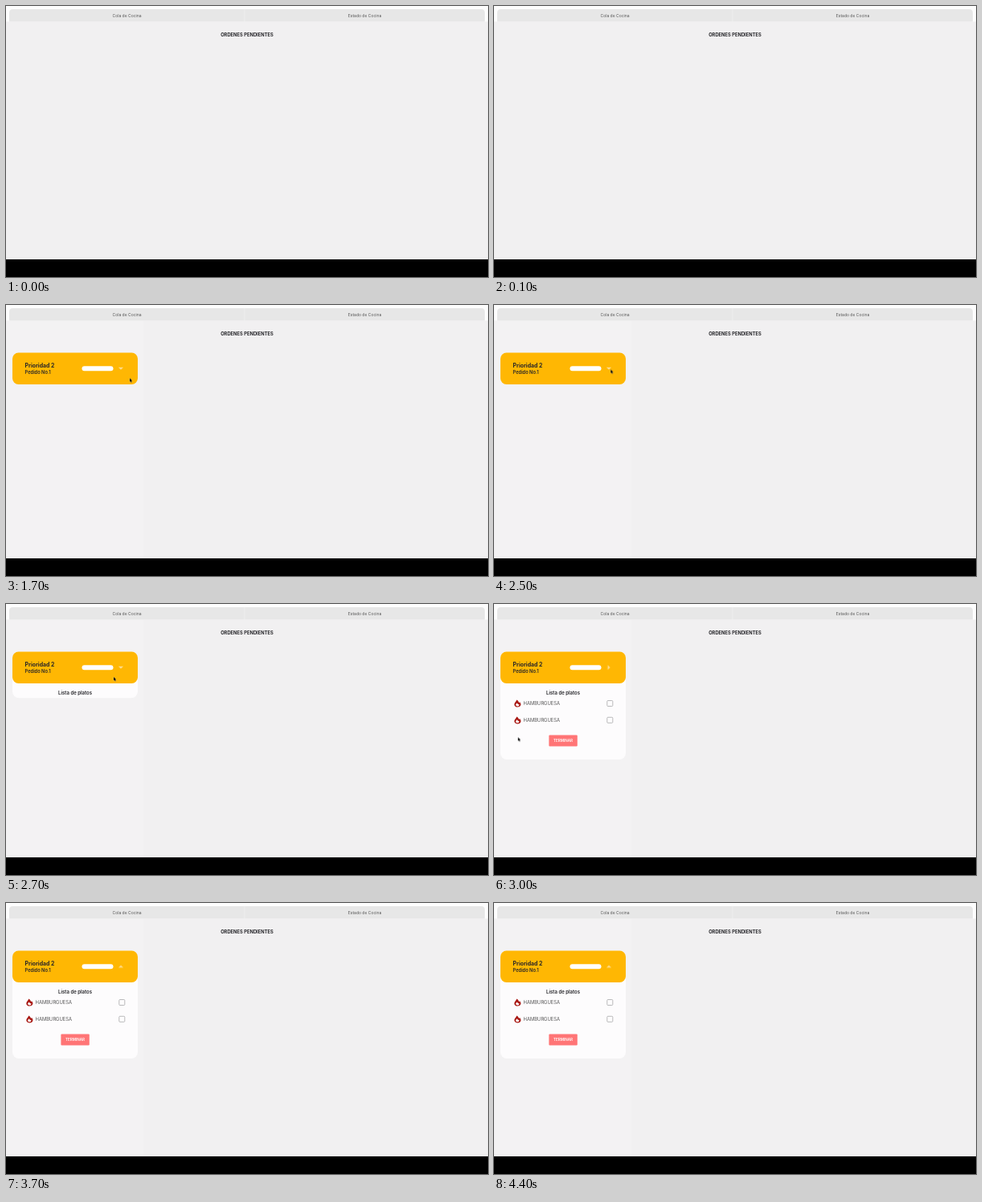
Write an HTML page that moves like this. It is 600 by 338 pixels and loops after 5 s.

```html
<!DOCTYPE html>
<html lang="es">
<head>
<meta charset="utf-8">
<title>Cola de Cocina</title>
<style>
  html, body { margin: 0; width: 100%; height: 100%; overflow: hidden; background: #000; }
  svg { display: block; width: 600px; height: 338px; }
  text { font-family: Inter, Roboto, sans-serif; fill: #242428; }
  .mid { text-anchor: middle; }
  .tab { font-size: 5px; fill: #555; }
  .bold { font-weight: 700; }
  .semi { font-weight: 600; }
  .dish { font-size: 5.9px; font-weight: 300; fill: #222; }

  .order, .panel, .body, .arrow, .cursor {
    animation: 5s -20ms infinite;
  }
  .order { animation-name: order; animation-timing-function: step-end; }
  .body { animation-name: body; animation-timing-function: step-end; }
  .panel { animation-name: expand; }
  .arrow { animation-name: flip; transform-origin: 143px 79.2px; animation-timing-function: linear; }
  .cursor { animation-name: point; animation-timing-function: step-end; }

  @keyframes order { 0% { opacity: 0 } 20%, 100% { opacity: 1 } }
  @keyframes body { 0% { opacity: 0 } 54%, 100% { opacity: 1 } }
  @keyframes expand {
    0%, 53% { height: 38px; animation-timing-function: cubic-bezier(.4, 0, .2, 1) }
    59%, 100% { height: 134.5px }
  }
  @keyframes flip {
    0%, 57% { transform: rotate(0deg) }
    64%, 100% { transform: rotate(-180deg) }
  }
  @keyframes point {
    0% { opacity: 0; transform: translate(167px, 105px) }
    32% { opacity: 1; transform: translate(167px, 105px) }
    34% { opacity: 1; transform: translate(154px, 91.3px) }
    36% { opacity: 1; transform: translate(149px, 88px) }
    38% { opacity: 1; transform: translate(146px, 86.5px) }
    40% { opacity: 1; transform: translate(145px, 86px) }
    48% { opacity: 1; transform: translate(145px, 83px) }
    50% { opacity: 1; transform: translate(145.2px, 80.5px) }
    54% { opacity: 1; transform: translate(134px, 91px) }
    56% { opacity: 1; transform: translate(94px, 128px) }
    58% { opacity: 1; transform: translate(48px, 158px) }
    60% { opacity: 1; transform: translate(29.8px, 166.2px) }
    66% { opacity: 1; transform: translate(62px, 181px) }
    68% { opacity: 1; transform: translate(142px, 220px) }
    70% { opacity: 1; transform: translate(246px, 268px) }
    72% { opacity: 1; transform: translate(336px, 305px) }
    74%, 100% { opacity: 0; transform: translate(336px, 305px) }
  }
</style>
</head>
<body>
<svg viewBox="0 0 600 338">
  <defs>
    <clipPath id="reveal"><rect class="panel" x="8" y="59.5" width="156" height="38" rx="8"/></clipPath>
    <g id="dish">
      <path fill="#a81712" d="M28.4 119.6C29.9 120.7 30.8 122 31.2 123.2L32.1 122.2C33 123.4 33.5 124.6 33.4 125.6C33.2 127.5 31.5 128.6 29.4 128.6C27.1 128.6 25.3 127.3 25.3 125.2C25.3 123.4 27.5 121.8 28.4 119.6Z"/>
      <path fill="#fdfcfd" d="M28.7 123.4L30.3 125.5L31.1 124.7C31.7 126.2 31.1 127.5 29.4 127.5C27.9 127.5 27 126.7 27.1 125.6C27.2 124.8 28.1 124.2 28.7 123.4Z"/>
      <text class="dish" x="36.6" y="126.1">HAMBURGUESA</text>
      <rect x="140.8" y="120.5" width="7" height="7" rx="1" fill="none" stroke="#a9a9ab" stroke-width=".8"/>
    </g>
  </defs>

  <rect width="600" height="20" fill="#fdfdfd"/>
  <rect y="19.5" width="600" height="296.5" fill="#f1f0f1"/>
  <path d="M4 19.5V8.5Q4 4 8.5 4H591.5Q596 4 596 8.5V19.5Z" fill="#e7e7e7"/>
  <path d="M297 4V19.5" stroke="#f1f1f1" stroke-width=".8"/>
  <text class="tab mid" x="150.5" y="13.7">Cola de Cocina</text>
  <text class="tab mid" x="446.5" y="13.7">Estado de Cocina</text>

  <g class="order"><rect y="20" width="171" height="296" fill="#f3f2f3"/></g>
  <text class="bold mid" x="300" y="38.1" font-size="5.8">ORDENES PENDIENTES</text>

  <g class="body"><g clip-path="url(#reveal)">
    <rect x="8" y="59.5" width="156" height="134.5" fill="#fdfcfd"/>
    <text class="semi mid" x="86" y="112.8" font-size="6">Lista de platos</text>
    <use href="#dish"/>
    <use href="#dish" y="20.8"/>
    <rect x="68.4" y="163.4" width="35.4" height="14.2" rx="1" fill="#ff7576"/>
    <text class="semi mid" x="86" y="172" font-size="4.6" style="fill:#fff">TERMINAR</text>
  </g></g>

  <g class="order">
    <rect x="8" y="59.5" width="156" height="39.5" rx="7.5" fill="#ffb703"/>
    <text class="bold" x="23.6" y="78.1" font-size="6.9">Prioridad 2</text>
    <text class="semi" x="23.6" y="86.2" font-size="5.7">Pedido No.1</text>
    <rect x="94.5" y="76.2" width="39" height="6" rx="3" fill="#fff"/>
    <path class="arrow" d="M139.9 77.7H146.1L143 80.8Z" fill="#ffdc8c"/>
  </g>

  <path class="cursor" d="M0 0V4.6L1.1 3.7 1.9 5.4 2.7 5 2 3.4 3.3 3.2Z" fill="#111" stroke="#fff" stroke-opacity=".5" stroke-width=".5" paint-order="stroke"/>
</svg>
</body>
</html>
```
